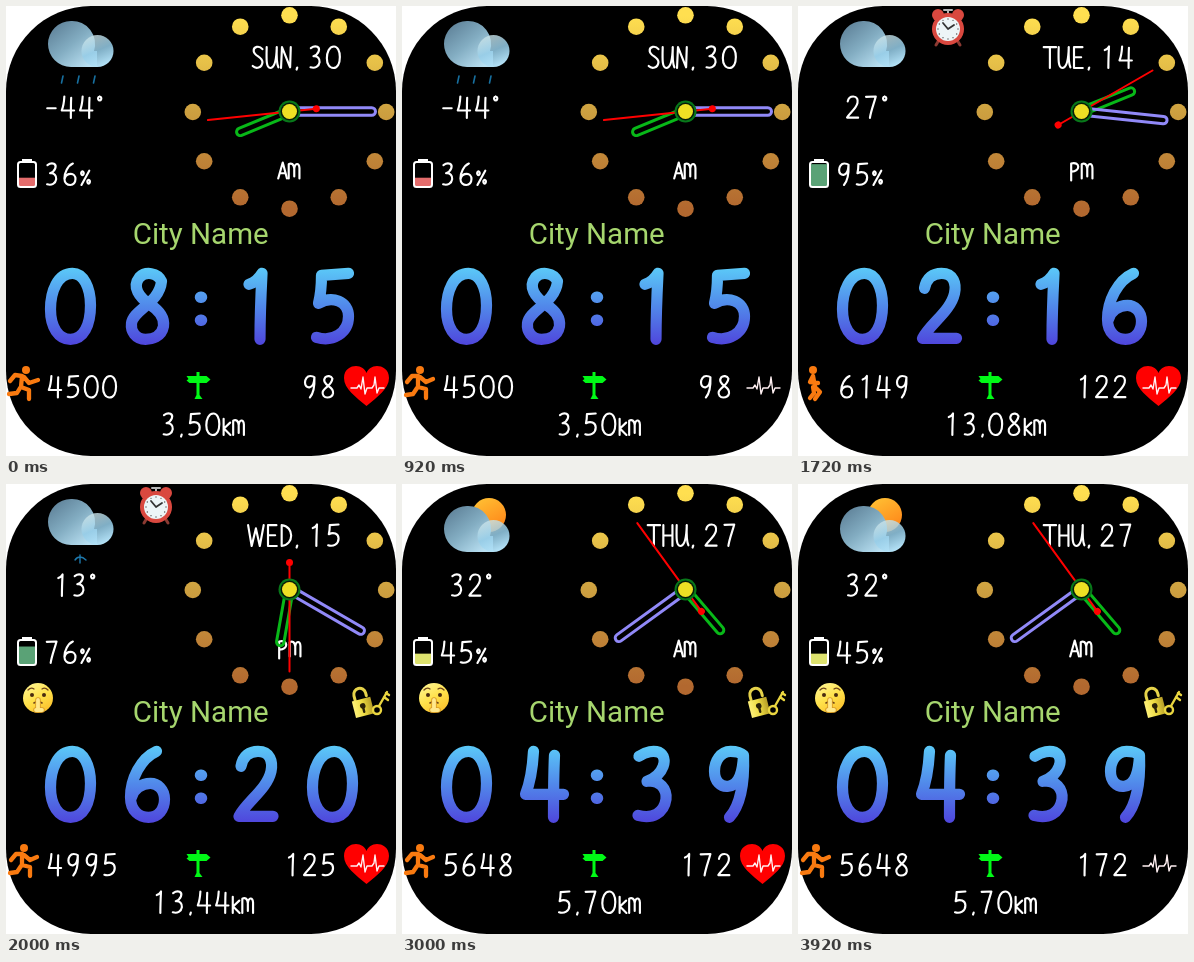
Animation, 390 px wide and 450 px high, one loop 4 s. Source, as an HTML page with a canvas:

```html
<!DOCTYPE html>
<html lang="en">
<head>
<meta charset="utf-8">
<title>Watch face</title>
<style>
html, body { margin: 0; width: 100%; height: 100%; overflow: hidden; background: #fff; }
canvas { display: block; }
</style>
</head>
<body>
<canvas id="face" width="390" height="450"></canvas>
<script>
const ctx = document.getElementById('face').getContext('2d');
const LOOP = 4000, TICK = 40;

// Handwritten alphabet: pen strokes centred on x = 0, from y = 0 to y = 66.
const GLYPHS = {
  0: 'M2 0C-13 0 -20 18 -20 36C-20 54 -12 66 0 66C13 66 20 52 20 32C20 14 13 0 2 0Z',
  1: 'M-7 11C-1 9 3 5 6 0C5 20 4 45 4 66',
  2: 'M-15 15C-13 4 -6 0 2 0C14 0 17 10 15 20C11 38 -9 50 -17 65H17',
  3: 'M-13 5C-6 0 2 -1 7 1C17 6 12 24 -5 30C8 28 15 38 14 48C12 62 0 68 -14 64',
  4: 'M-10 0C-11 18 -14 33 -18 43H20M11 4C10 26 10 46 10 66',
  5: 'M16 0L-11 2C-11 12 -12 22 -14 30C0 22 16 28 16 43C16 60 0 69 -16 64',
  6: 'M9 0C-7 7 -17 28 -17 46C-17 60 -8 66 1 66C11 66 17 58 17 48C17 38 10 32 3 32C-6 32 -14 38 -16 46',
  7: 'M-15 1L15 0C10 20 0 44 -3 66',
  8: 'M14 8C10 -1 -2 -2 -8 4C-16 14 -8 24 2 31C13 38 17 46 16 53C14 64 4 66 -2 66C-12 66 -17 58 -16 50C-14 36 12 30 14 8Z',
  9: 'M15 4C12 1 8 0 2 0C-8 0 -14 10 -14 20C-14 30 -8 36 0 35C8 34 14 26 15 4C16 30 12 54 1 66',
  S: 'M14 8C4 -4 -14 0 -13 14C-11 30 14 32 14 48C13 66 -6 70 -16 60',
  U: 'M-16 2C-17 40 -18 66 -5 66C8 66 14 40 15 2C14 30 15 54 20 64',
  N: 'M-15 66L-12 2L13 64L15 2',
  T: 'M-19 2H19M0 2V66',
  E: 'M14 2H-12V66H15M-12 33H10',
  W: 'M-24 2L-13 66L0 12L12 66L24 2',
  D: 'M-13 2V66C26 62 26 6 -13 2',
  H: 'M-14 2V66M14 2V66M-14 34H14',
  a: 'M-14 66L0 17L13 66M-9 50H9',
  p: 'M-11 20V72M-11 20C18 12 18 46 -11 45',
  k: 'M-11 16V66M9 28L-10 46L10 66',
  m: 'M-17 66V22C-10 18 -1 20 0 36V60V36C2 18 15 16 16 34V66',
  '%': 'M12 22L-12 66M-9 24a4 6 0 1 0 .1 0M10 50a4 6 0 1 0 .1 0',
  '°': 'M-5 0a5 6 0 1 0 .1 0',
  '-': 'M-13 36H13',
  '.': 'M1 65l-2 6',
  ':': 'M0 24h1M0 47h1'
};
for (const c in GLYPHS) GLYPHS[c] = new Path2D(GLYPHS[c]);

const RUNNER = [
  [20, 364, 'M16 370L15 381M16 370L9 369L4 375M18 371L23 377L32 374M15 381L23 384L23 393M14 382L11 387L3 388'],
  [22, 364, 'M18 370L16 381M17 370L11 373L9 379M19 371L22 376L27 376M16 381L21 386L17 394M15 381L13 388L6 390'],
  [15, 364, 'M15 370L17 381M15 370L12 376L20 377M17 381L22 386L17 393M15 381L16 387L12 392'],
  [17, 364, 'M16 370L17 381M15 370L9 374L8 380M17 371L21 377L27 379M17 381L22 385L20 393M15 381L14 387L9 393'],
  [18, 364, 'M16 370L16 381M16 370L10 370L5 376M18 371L24 376L31 373M16 381L24 383L24 392M15 382L11 388L4 389']
].map(([x, y, limbs]) => ({ x, y, limbs: new Path2D(limbs) }));

const SCENES = [
  { sky: 'rain', temp: '-44°', charge: 36, fuel: '#e46c6c', date: 'SUN. 30', half: 'am',
    time: '0815', sec: 44, steps: '4500', pulse: '98', dist: '3.50km' },
  { sky: 'cloud', temp: '27°', charge: 95, fuel: '#5aa276', date: 'TUE. 14', half: 'pm',
    time: '0216', sec: 10, steps: '6149', pulse: '122', dist: '13.08km', alarm: true },
  { sky: 'snow', temp: '13°', charge: 76, fuel: '#5aa276', date: 'WED. 15', half: 'pm',
    time: '0620', sec: 30, steps: '4995', pulse: '125', dist: '13.44km', alarm: true, quiet: true },
  { sky: 'sun', temp: '32°', charge: 45, fuel: '#dde26e', date: 'THU. 27', half: 'am',
    time: '0439', sec: 54, steps: '5648', pulse: '172', dist: '5.70km', quiet: true }
];

function gradient(x0, y0, x1, y1, ...colours) {
  const g = ctx.createLinearGradient(x0, y0, x1, y1);
  colours.forEach((c, i) => g.addColorStop(i / (colours.length - 1), c));
  return g;
}
const TIME_INK = gradient(0, -6, 0, 72, '#5bcaf8', '#5188ea', '#4f45dc');
const DOT_INK = gradient(0, 10, 0, 202, '#ffdf50', '#cda040', '#b2682f');

function disc(x, y, r, fill) {
  ctx.beginPath();
  ctx.arc(x, y, r, 0, 7);
  ctx.fillStyle = fill;
  ctx.fill();
}
function fill(path, colour) {
  ctx.fillStyle = colour;
  ctx.fill(new Path2D(path));
}
function line(path, colour, width) {
  ctx.strokeStyle = colour;
  ctx.lineWidth = width;
  ctx.stroke(path instanceof Path2D ? path : new Path2D(path));
}
function placed(x, y, turn, draw) {
  ctx.save();
  ctx.translate(x, y);
  ctx.rotate(turn);
  draw();
  ctx.restore();
}

function glyph(c, x, y, scale, colour, width) {
  placed(x, y, 0, () => {
    ctx.scale(scale, scale);
    line(GLYPHS[c], colour, width);
  });
}
function advance(c) {
  if (c === ' ') return 5;
  if (c === '.') return 8;
  if (c === 'W') return 18;
  if ('ka'.includes(c)) return 10.5;
  if ('m°%p'.includes(c)) return 12.5;
  return c >= 'A' || c === '-' ? 14 : 18.3;
}
// align: 0 left, 0.5 centre, 1 right
function write(text, x, y, align) {
  const chars = [...text];
  x -= align * chars.reduce((sum, c) => sum + advance(c), 0);
  for (const c of chars) {
    const w = advance(c);
    if (c !== ' ') glyph(c, x + w / 2, y, 0.325, '#fff', 6.6);
    x += w;
  }
}

function weather(sky) {
  const sunny = sky === 'sun';
  if (sunny) disc(87, 31, 17, gradient(80, 14, 98, 46, '#ffbd32', '#ff8418'));
  placed(0, sunny ? 7 : 0, 0, () => {
    fill('M65 15a23 23 0 0 0 0 46H91V45H88A23 23 0 0 0 65 15Z',
      gradient(48, 18, 82, 60, '#5f8299', '#83adc2', '#b9e0f2'));
    disc(91.5, 45, 16, gradient(84, 30, 97, 60, 'rgba(205,228,232,.8)', 'rgba(150,205,232,.85)', '#b5e3f8'));
  });
  if (sky === 'rain') for (const x of [57, 73, 89]) line(`M${x} 70l-1.5 7`, '#176f9f', 1.6);
  if (sky === 'snow') line('M74 71v8M69 76q2 -3 5 -3q3 0 6 3', '#1d78ac', 1.4);
}

function battery(level, colour) {
  const h = 23 * level / 100;
  ctx.fillStyle = colour;
  ctx.fillRect(13, 180 - h, 16, h);
  ctx.beginPath();
  ctx.roundRect(12, 156, 18, 25, 2.5);
  ctx.strokeStyle = '#fff';
  ctx.lineWidth = 2;
  ctx.stroke();
  fill('M16 156v-3h10v3z', '#fff');
}

function alarmClock() {
  line('M141 34l-3 5M159 34l3 5', '#8b3a32', 3);
  disc(140, 9, 6, '#d9483f');
  disc(160, 9, 6, '#d9483f');
  line('M150 7V4M146 4h8', '#b5b5b5', 2);
  disc(150, 23, 16, '#d9483f');
  disc(150, 23, 12, '#edf5f7');
  line('M150 23L145 17M150 23L156 19', '#333', 1.8);
  for (let i = 0; i < 12; i++) disc(150 + 10 * Math.sin(i * Math.PI / 6), 23 - 10 * Math.cos(i * Math.PI / 6), 0.7, '#555');
}

function quietIcons() {
  disc(32, 214, 15, gradient(22, 201, 38, 229, '#fff38a', '#ffe14a', '#fbc02c'));
  disc(26, 211, 2, '#4a2b10');
  disc(38, 211, 2, '#4a2b10');
  line('M22 206q3 -3 6 -1M36 205q3 -2 6 1', '#70451a', 1.3);
  line('M28 219q4 -3 8 0', '#70451a', 1.6);
  line('M32 216V224M30 226h6', '#d99a24', 5.5);
  line('M32 216V224M30 226h6', '#ffe88c', 3.8);

  placed(356, 219, -0.25, () => {
    line('M-6 -4V-9a6 6 0 0 1 12 0V-6', '#e6d34a', 3);
    ctx.fillStyle = gradient(-10, 0, 10, 0, '#fff27c', '#eddb42', '#b39a25');
    ctx.fillRect(-9.5, -4, 19, 17);
    disc(0, 3, 2.8, '#2b2208');
    line('M0 4V9', '#2b2208', 2.4);
  });
  line('M373 222L381 208M378 213l4 3M380 209l3 2', '#ead640', 2.4);
  ctx.beginPath();
  ctx.arc(371, 226, 4, 0, 7);
  ctx.stroke();
}

function hand(degrees, length, colour) {
  placed(283.5, 105.5, degrees * Math.PI / 180, () => {
    ctx.beginPath();
    ctx.roundRect(-3.7, -length, 7.4, length, 3.7);
    ctx.strokeStyle = colour;
    ctx.lineWidth = 3;
    ctx.stroke();
  });
}
function dial(time, sec) {
  const hour = +time.slice(0, 2), minute = +time.slice(2);
  hand(hour * 30 + minute / 2, 57, '#08b818');
  hand(minute * 6, 86, '#9189f8');
  placed(283.5, 105.5, sec * Math.PI / 30, () => {
    line('M0 27V-82', '#f00', 2);
    disc(0, 27, 3.5, '#f00');
  });
  disc(283.5, 105.5, 11, '#08781a');
  disc(283.5, 105.5, 9, '#061c08');
  disc(283.5, 105.5, 7.5, '#eee024');
}

function heart(beat) {
  if (beat) fill('M360.5 400C350 391 338 383 338 372C338 363 345 360 350 360C355 360 359 363 360.5 367' +
    'C362 363 366 360 371 360C376 360 383 363 383 372C383 383 371 391 360.5 400Z', '#f00');
  line('M345 382h6l2 -3l2 4l2 -12l2 17l2 -6h5l2 -3l1 -8l2 16l2 -5h5', '#fff0f2', 1.4);
}

function runner(pose) {
  line(pose.limbs, '#f97a10', 4.3);
  disc(pose.x, pose.y, 4, '#f97a10');
}

function draw(t) {
  const s = SCENES[Math.floor(t / 1000)];
  ctx.clearRect(0, 0, 390, 450);
  ctx.beginPath();
  ctx.roundRect(0, 0, 390, 450, 85);
  ctx.fillStyle = '#000';
  ctx.fill();
  ctx.lineCap = ctx.lineJoin = 'round';

  for (let i = 0; i < 12; i++) {
    const a = i * Math.PI / 6, r = i % 3 ? 98.5 : 96.7;
    disc(283.5 + r * Math.sin(a), 106 - r * Math.cos(a), 8.3, DOT_INK);
  }
  weather(s.sky);
  write(s.temp, 70, 90.5, 0.5);
  battery(s.charge, s.fuel);
  write(s.charge + '%', 36.5, 157.5, 0);
  if (s.alarm) alarmClock();
  if (s.quiet) quietIcons();

  write(s.date, 336.5, 40.5, 1);
  write(s.half, 283, 151, 0.5);
  dial(s.time, s.sec);

  ctx.font = '29.5px Roboto, sans-serif';
  ctx.textAlign = 'center';
  ctx.fillStyle = '#a6d66e';
  ctx.fillText('City Name', 194.7, 238);

  [64.5, 141.5, 250, 326.5].forEach((x, i) => glyph(s.time[i], x, 267.3, 1, TIME_INK, 11.2));
  glyph(':', 194.5, 267.3, 1, TIME_INK, 11.5);

  runner(RUNNER[Math.floor((t + 1.5) / 100.1) % RUNNER.length]);
  write(s.steps, 39.5, 370, 0);
  fill('M190.5 366h3v4h7l4 3.5l-4 3.5h-7v12l3 4h-8l2 -4v-12h-7l-3 -2.5l2 -1.5l-2 -3h10z', '#00f916');
  write(s.pulse, 331, 370, 1);
  heart(Math.floor(t / 670) % 2 === 0);
  write(s.dist, 196, 407.5, 0.5);
}

function loop() {
  const t = performance.now() % LOOP;
  draw(Math.floor(t / TICK) * TICK);
  requestAnimationFrame(loop);
}
loop();
</script>
</body>
</html>
```
